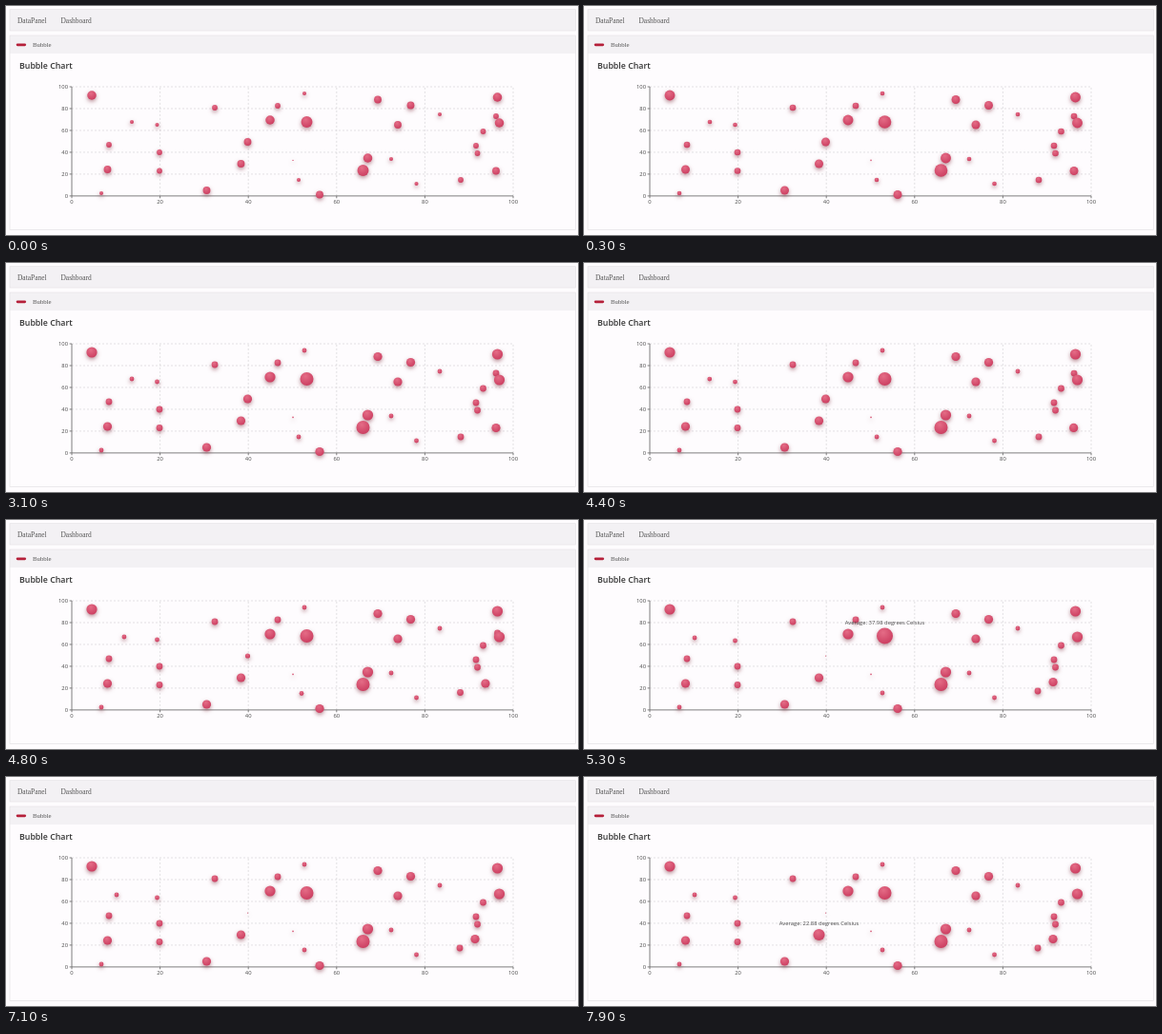
Recreate the animation shown at these times as an HTML page. Size 600 by 241 pixels, loop 8000 ms.

```html
<!DOCTYPE html>
<html lang="en">
<head>
<meta charset="utf-8">
<title>Bubble Chart</title>
<style>
  html, body { margin: 0; width: 100%; height: 100%; overflow: hidden; background: #fefcfe; }
  svg { display: block; width: 600px; height: 241px; }
  .bar { fill: #f3f1f4; stroke: #e4e2e5; stroke-width: .7; }
  .panel { fill: none; stroke: #e4e2e5; stroke-width: .7; }
  .nav { font: 7.45px "Liberation Serif", serif; fill: #555; }
  .title { font: 600 8.8px "Open Sans", sans-serif; fill: #333; }
  .label { font: 5.85px "Open Sans", sans-serif; fill: #484848; }
  .grid { stroke: #d6d4d7; stroke-width: .7; stroke-dasharray: 2 2; }
  .axis { stroke: #707070; stroke-width: .9; }
  circle { fill: url(#rose); filter: drop-shadow(0 2.3px 2.2px rgba(120, 36, 50, .5)); }
</style>
</head>
<body>
<svg viewBox="0 0 600 241">
  <defs>
    <radialGradient id="rose" cx=".4" cy=".3" r="1">
      <stop offset="0" stop-color="rgb(228,108,134)"/>
      <stop offset="1" stop-color="rgb(194,44,82)"/>
    </radialGradient>
  </defs>
  <rect class="bar" x="4" y="3.7" width="593.5" height="22.3"/>
  <text class="nav" x="12" y="17.9">DataPanel</text>
  <text class="nav" x="57.5" y="17.9">Dashboard</text>
  <rect class="bar" x="4" y="31" width="593.5" height="19" style="stroke:none"/>
  <rect class="panel" x="4" y="31" width="593.5" height="204.5"/>
  <rect x="10.7" y="39.4" width="10.4" height="2.8" rx="1.4" fill="#b5203a"/>
  <text class="nav" x="28" y="42.8" style="font-size:6.8px">Bubble</text>
  <text class="title" x="14" y="66">Bubble Chart</text>
  <g id="axes"></g>
  <g id="bubbles"></g>
  <text class="label" id="tip" text-anchor="middle"></text>
</svg>
<script>
const LOOP = 8000;
const LEFT = 69, RIGHT = 532, TOP = 85, BOTTOM = 199.9;
const $ = id => document.getElementById(id);

function set(el, attrs) {
  for (const key in attrs) el.setAttribute(key, attrs[key]);
}
function add(parent, tag, attrs, text = '') {
  const el = document.createElementNS('http://www.w3.org/2000/svg', tag);
  set(el, attrs);
  el.textContent = text;
  return parent.appendChild(el);
}
const line = (cls, x1, y1, x2, y2) => add($('axes'), 'line', { class: cls, x1, y1, x2, y2 });
const label = (x, y, anchor, text) =>
  add($('axes'), 'text', { class: 'label', x, y, 'text-anchor': anchor }, text);

for (let v = 0; v <= 100; v += 20) {
  const x = LEFT + (RIGHT - LEFT) * v / 100;
  const y = BOTTOM - (BOTTOM - TOP) * v / 100;
  if (v) {
    line('grid', x, BOTTOM, x, TOP);
    line('grid', LEFT, y, RIGHT, y);
  }
  line('axis', x, BOTTOM, x, BOTTOM + 2.4);
  line('axis', LEFT, y, LEFT - 2.4, y);
  label(x, 207.8, 'middle', v);
  label(65, y + 2, 'end', v);
}
line('axis', LEFT, BOTTOM, RIGHT, BOTTOM);
line('axis', LEFT, BOTTOM, LEFT, TOP);

// Centres by radius; further values are the change (dx, dy, dr) at the data refresh
const group = (r, ...points) =>
  points.map(([x, y, dx = 0, dy = 0, dr = 0]) => ({ x, y, r, dx, dy, dr }));
const bubbles = [
  ...group(.8, [301, 162.4]),
  ...group(2.4, [132, 122, -16, 2], [158.5, 125, 0, 2], [100, 197], [313, 92], [307, 183, 6, -1],
    [455, 114], [404, 161], [430.5, 187]),
  ...group(3.4, [108, 146], [161, 154], [161, 173.5], [219, 107], [285, 105], [477, 183, -1, -3],
    [514, 116, 3, 6], [500.5, 132], [493, 147], [494.5, 155]),
  ...group(4.6, [106.5, 172], [210.5, 194], [253.5, 143, 0, 0, -4], [246.5, 166], [329, 198.5],
    [390, 98.5], [424.5, 104.5], [411, 125], [514, 173.5, -22, -3]),
  ...group(5.6, [90, 94], [277, 120], [379.5, 160], [515.5, 96], [517.5, 123]),
  ...group(7, [315.5, 122], [374.5, 173])
];
const hovers = [
  { x: 210, y: 194, on: 3130, off: 3330, value: '26.45' },
  { x: 315, y: 122, on: 5260, off: 5750, value: '37.98' },
  { x: 379, y: 160, on: 6130, off: 6370, value: '29.24' },
  { x: 246, y: 166, on: 7400, off: LOOP, value: '22.88' }
];
for (const h of hovers) {
  h.index = bubbles.findIndex(b => Math.hypot(b.x - h.x, b.y - h.y) < b.r);
}
const circles = bubbles.map(() => add($('bubbles'), 'circle', {}));

const clamp = p => Math.min(1, Math.max(0, p));
const quinticInOut = p => p < .5 ? 16 * p ** 5 : 1 - 16 * (1 - p) ** 5;
const elasticOut = p => p <= 0 ? 0 : p >= 1 ? 1 :
  1 + 2 ** (-10 * p) * Math.sin((p - .1) * 2 * Math.PI / .4);

function draw(t) {
  const entry = quinticInOut(clamp((t + 1580) / 2600));
  const update = quinticInOut(clamp((t - 4000) / 1600));
  const pose = bubbles.map(b => ({
    x: b.x + b.dx * update,
    y: b.y + b.dy * update,
    r: (b.r + b.dr * update) * entry
  }));

  $('tip').textContent = '';
  for (const { index, on, off, value } of hovers) {
    const b = pose[index];
    if (t >= on && t < off) {
      set($('tip'), { x: b.x, y: b.y - b.r - 5 });
      $('tip').textContent = `Average: ${value} degrees Celsius`;
    }
    b.r += 1.45 * (elasticOut((t - on) / 400) - elasticOut((t - off) / 400));
  }
  pose.forEach((b, i) => set(circles[i], { cx: b.x, cy: b.y, r: Math.max(0, b.r) }));
}

function frame() {
  draw(performance.now() % LOOP);
  requestAnimationFrame(frame);
}
frame();
</script>
</body>
</html>
```
